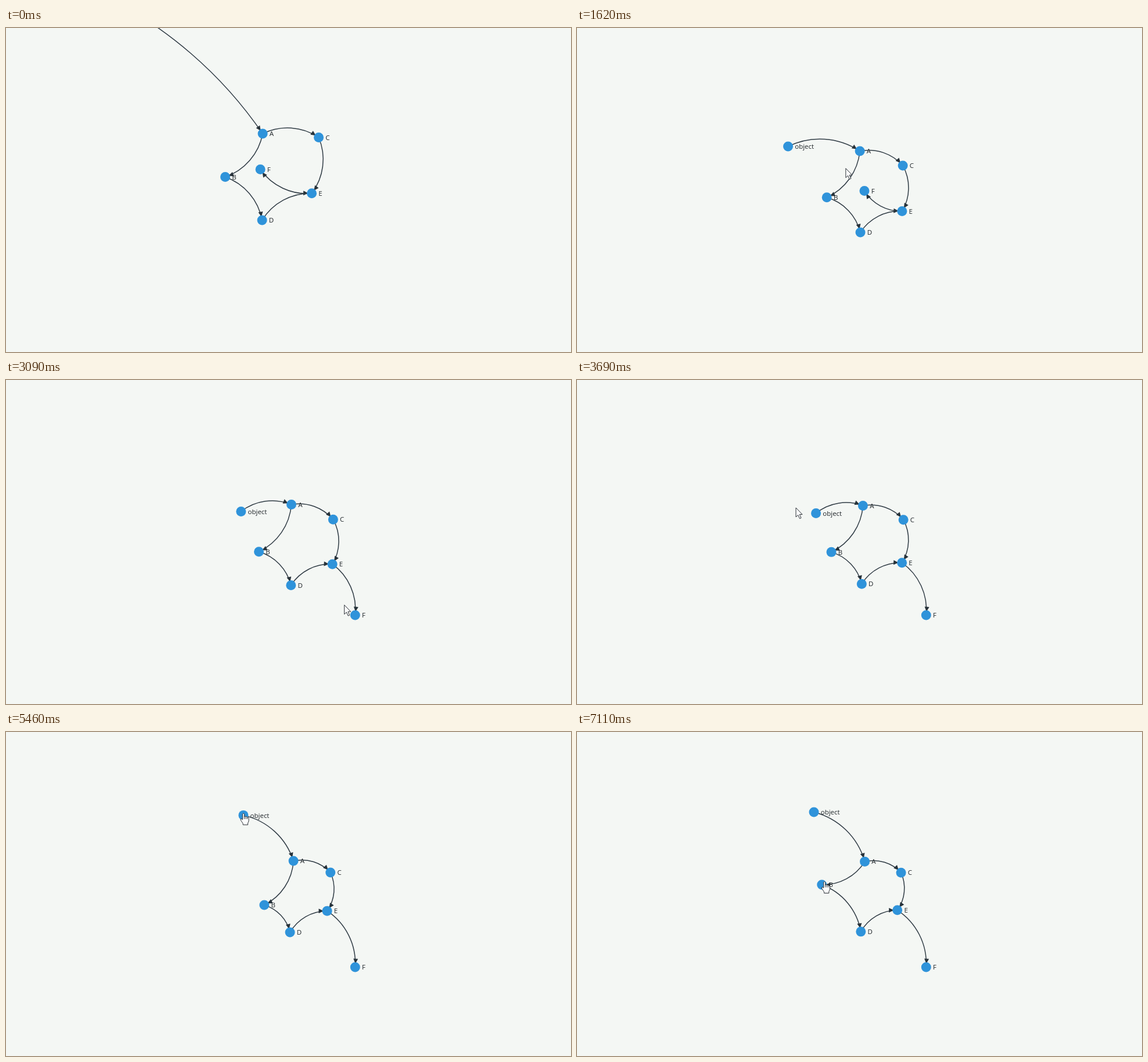
An HTML page with a canvas that plays this animation: 973x558 px, repeating every 7.14 s.

```html
<!DOCTYPE html>
<html lang="en">
<head>
<meta charset="utf-8">
<title>Force graph</title>
<style>
  html, body { margin: 0; width: 100%; height: 100%; overflow: hidden; background: #f4f7f4; }
  canvas { display: block; }
</style>
</head>
<body>
<canvas id="stage" width="973" height="558"></canvas>
<script>
const ctx = document.getElementById('stage').getContext('2d');
const LOOP = 7140;
const INK = '#2f3b44', BLUE = '#2f93da', PAPER = '#f4f7f4';

// Poses of each node: pulled away, swinging back, gathered, at rest
const nodes = {
  object: [[-207, -129], [255, 143.7], [401.5, 225], [433.7, 239.2]],
  A: [[442, 182], [476, 207.8], [491, 213.5], [495.6, 223.2]],
  B: [[377.5, 256.5], [418.5, 281.3], [434.3, 295.5], [446.3, 298.3]],
  C: [[538.5, 188.4], [553, 228.8], [564, 240], [558, 242.3]],
  D: [[441, 331], [479.5, 345], [491, 354.5], [488.8, 343.8]],
  E: [[526.5, 284.7], [550, 306.8], [563.3, 318.4], [551.6, 306.7]],
  F: [[438, 243.5], [482, 273], [499.5, 283], [499.5, 283]]
};
const links = ['object A', 'A B', 'A C', 'B D', 'C E', 'D E', 'E F'].map(s => s.split(' '));
const SWING = 870, GATHER = 2400, RELAX = 2110;

// Mouse stops: time, x, y
const stops = [
  [450, 240, -30], [870, 429, 206], [2420, 500, 281], [2960, 601.8, 403],
  [3690, 377, 220], [4250, 418, 227], [4630, 423, 231], [5600, 408, 134.5],
  [6240, 446.5, 304], [6480, 449.6, 292.2], [7080, 426.2, 257.5]
];
// A dragged node follows the mouse, then stays where it is dropped
const drags = {
  F: { from: 2420, to: 2960, grab: [0.5, -2] },
  object: { from: 4630, to: 5600, grab: [0, -3.5] },
  B: { from: 6480, to: LOOP, grab: [4.5, -5.5] }
};

const clamp = u => Math.min(1, Math.max(0, u));
const smooth = u => u * u * (3 - 2 * u);
const mix = (p, q, u) => p.map((v, i) => v + (q[i] - v) * u);

function pointerAt(t) {
  const i = Math.max(1, stops.findIndex(s => s[0] > t));
  if (t >= stops[stops.length - 1][0]) return stops[stops.length - 1].slice(1);
  const [a, b] = [stops[i - 1], stops[i]];
  return mix(a.slice(1), b.slice(1), smooth(clamp((t - a[0]) / (b[0] - a[0]))));
}

function nodeAt(name, t) {
  const drag = drags[name], [away, swing, gathered, rest] = nodes[name];
  if (drag && t >= drag.from) {
    const [x, y] = pointerAt(Math.min(t, drag.to));
    return [x - drag.grab[0], y - drag.grab[1]];
  }
  if (t < SWING) {
    const u = t / SWING;
    return mix(away, swing, u * (1.15 - 0.15 * u));
  }
  if (t < GATHER) {
    const left = (GATHER - t) / (GATHER - SWING);
    return mix(swing, gathered, 1 - left * left);
  }
  return mix(gathered, rest, 1 - Math.exp(-(((t - GATHER) / RELAX) ** 2)));
}

// Clockwise arc whose radius equals the distance between its ends
function drawLink([x1, y1], [x2, y2]) {
  const dx = x2 - x1, dy = y2 - y1, r = Math.hypot(dx, dy);
  const k = Math.sqrt(3) / 2;
  const cx = (x1 + x2) / 2 - dy * k, cy = (y1 + y2) / 2 + dx * k;
  ctx.beginPath();
  ctx.arc(cx, cy, r, Math.atan2(y1 - cy, x1 - cx), Math.atan2(y2 - cy, x2 - cx));
  ctx.strokeStyle = INK;
  ctx.lineWidth = 1.5;
  ctx.stroke();

  ctx.save();
  ctx.translate(x2, y2);
  ctx.rotate(Math.atan2(dy, dx) + Math.PI / 6);
  ctx.beginPath();
  ctx.moveTo(-14.5, -4);
  ctx.lineTo(-6, 0);
  ctx.lineTo(-14.5, 4);
  ctx.fillStyle = '#27323a';
  ctx.fill();
  ctx.restore();
}

function drawNode([x, y]) {
  ctx.beginPath();
  ctx.arc(x, y, 8.5, 0, 2 * Math.PI);
  ctx.fillStyle = BLUE;
  ctx.fill();
}

function drawLabel(name, [x, y]) {
  ctx.font = '11.5px "Open Sans", "Noto Sans", sans-serif';
  ctx.fillStyle = '#20262a';
  ctx.fillText(name, x + 11.7, y + 4.2);
}

const arrowShape = new Path2D('M0 0V16L3.7 12.5L6.5 18.7L9 17.6L6.3 11.5H11Z');
const handShape = new Path2D(
  'M-1.5 11V1.2Q0 -1 1.5 1.2V6Q3 4.3 4.2 6.2Q5.8 5 6.8 6.9Q9 6 9.2 8.8V13' +
  'Q8.8 15.5 7.6 17V20H-.7V17.8Q-3 14.5-4.8 11.5Q-5 9.2-3 9.8Z');
const fingerLines = new Path2D('M1.5 5V10M4.2 6V10M6.8 7V10');

function drawPointer(t) {
  const hand = Object.values(drags).some(d => t > d.from - 160 && t < d.to + 60);
  const shape = hand ? handShape : arrowShape;
  ctx.save();
  ctx.translate(...pointerAt(t));
  ctx.lineWidth = 1;
  ctx.lineJoin = 'round';
  ctx.strokeStyle = '#2b3036';
  ctx.fillStyle = '#fbfcfc';
  ctx.fill(shape);
  ctx.stroke(shape);
  if (hand) ctx.stroke(fingerLines);
  ctx.restore();
}

function draw(t) {
  ctx.fillStyle = PAPER;
  ctx.fillRect(0, 0, 973, 558);
  const at = {};
  for (const name in nodes) at[name] = nodeAt(name, t);
  links.forEach(([a, b]) => drawLink(at[a], at[b]));
  for (const name in at) drawNode(at[name]);
  for (const name in at) drawLabel(name, at[name]);
  drawPointer(t);
}

const start = performance.now();
function tick() {
  draw((performance.now() - start) % LOOP);
  requestAnimationFrame(tick);
}
tick();
</script>
</body>
</html>
```
